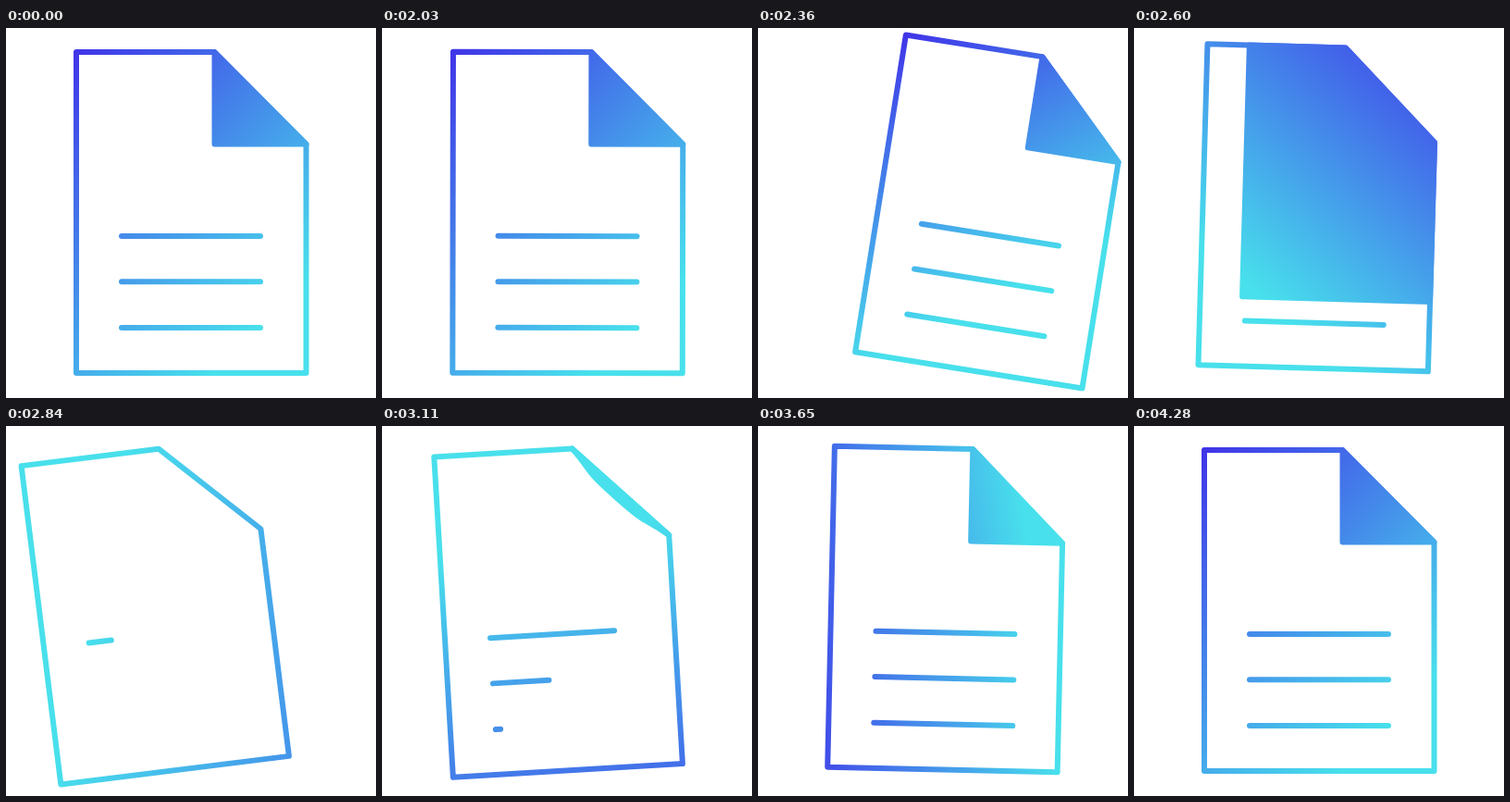
An HTML page with a canvas that plays this animation: 400x400 px, repeating every 4430 ms.

```html
<!DOCTYPE html>
<html lang="en">
<head>
<meta charset="utf-8">
<title>Page turn</title>
<style>
  html, body { margin: 0; width: 100%; height: 100%; overflow: hidden; background: #fff; }
  canvas { display: block; width: 400px; height: 400px; }
</style>
</head>
<body>
<canvas id="stage" width="400" height="400"></canvas>
<script>
const ctx = document.getElementById('stage').getContext('2d');
const LOOP = 4430;
const CX = 200.25, CY = 199.5;

// Page corners
const TL = [76, 26], TR = [225.5, 26], R = [324.5, 125.5], BR = [324.5, 373], BL = [76, 373];
const INNER = [225.5, 125.5];

// Tracks are lists of [time, value]
const SHIFT_X = [[2000, 0], [2350, 55], [2805, -39], [2850, -39], [3350, 15], [3800, 0]];
const SHIFT_Y = [[2000, 0], [2360, -1], [2550, -5.5], [2840, 0.5], [2900, 0.8], [3060, 0], [3380, -6.5], [3800, 0]];
const TILT = [[2000, 0], [2345, 9.1], [2880, -7.2], [2925, -7.2], [3390, 5.1], [3800, 0]];
const ANGLE = [[2000, 45], [2360, 53], [2600, 129], [2840, 200], [3320, 300], [4230, 405]];
const LENGTH = [[2000, 352], [2360, 298], [2600, 352], [2840, 560], [3320, 290], [4230, 352]];
const CENTRE = [[2000, 0.6], [2360, 0.72], [2600, 0.68], [2840, 0.88], [3320, 0.73], [4230, 0.6]];

const clamp = v => Math.min(1, Math.max(0, v));
const mix = (a, b, k) => a + (b - a) * k;
const mixPt = (a, b, k) => [mix(a[0], b[0], k), mix(a[1], b[1], k)];

// Same curve as cubic-bezier(.5, 0, .5, 1)
function ease(x) {
  x = clamp(x);
  let u = x;
  for (let i = 0; i < 5; i++) {
    u -= (1.5 * u * (1 - u) + u ** 3 - x) / (1.5 - 3 * u + 3 * u * u);
  }
  return u * u * (3 - 2 * u);
}
const span = (t, from, to) => ease((t - from) / (to - from));

function locate(track, t) {
  let i = 0;
  while (i < track.length - 2 && t > track[i + 1][0]) i++;
  return i;
}

function eased(track, t) {
  const i = locate(track, t), [t0, a] = track[i], [t1, b] = track[i + 1];
  return mix(a, b, span(t, t0, t1));
}

function smooth(track, t) {
  const i = locate(track, t), [t0, a] = track[i], [t1, b] = track[i + 1];
  const slope = j => j <= 0 || j >= track.length - 1 ? 0 :
    (track[j + 1][1] - track[j - 1][1]) / (track[j + 1][0] - track[j - 1][0]);
  const d = t1 - t0, s = clamp((t - t0) / d), s2 = s * s, s3 = s2 * s;
  return mix(a, b, 3 * s2 - 2 * s3) + d * (slope(i) * (s3 - 2 * s2 + s) + slope(i + 1) * (s3 - s2));
}

function gradient(t) {
  const a = smooth(ANGLE, t) * Math.PI / 180, len = smooth(LENGTH, t), c = smooth(CENTRE, t);
  const at = d => [CX + d * len * Math.cos(a), CY + d * len * Math.sin(a)];
  const g = ctx.createLinearGradient(...at(-c), ...at(1 - c));
  g.addColorStop(0, '#4035e8');
  g.addColorStop(1, '#48e0ec');
  return g;
}

function polygon(points, filled) {
  ctx.beginPath();
  points.forEach(p => ctx.lineTo(...p));
  ctx.closePath();
  if (filled) ctx.fill();
  ctx.stroke();
}

function textLines(t) {
  [225, 274.3, 324].forEach((y, i) => {
    const start = 2660 + i * 180;
    const k = t < 2720 ? 1 : span(t, start, start + 600);
    if (k <= 0.001) return;
    ctx.beginPath();
    ctx.moveTo(125, y);
    ctx.lineTo(125 + 150 * k, y);
    ctx.stroke();
  });
}

// The fold spreads over the page, then leaves by the lower left
function turningFold(t) {
  const k = span(t, 2390, 2740), out = span(t, 2660, 2830);
  const pts = [mixPt(TR, TL, k), TR, R, mixPt(R, BR, k), mixPt(INNER, BL, k)];
  if (out < 1) polygon(pts.map(p => mixPt(p, BL, out)), true);
}

// A new corner curls in from the diagonal
function curlingFold(t) {
  const q = span(t, 2980, 3500), r = 1 - q;
  const p = mixPt([275, 75.75], INNER, q), h = 40 * r, d = 25 * r;
  ctx.beginPath();
  ctx.moveTo(...TR);
  ctx.bezierCurveTo(TR[0] + d, TR[1] + d + 50 * q, p[0] - h, p[1] - h, ...p);
  ctx.bezierCurveTo(p[0] + h, p[1] + h, R[0] - d - 50 * q, R[1] - d, ...R);
  ctx.closePath();
  ctx.fill();
  ctx.stroke();
}

function draw(t) {
  ctx.setTransform(1, 0, 0, 1, 0, 0);
  ctx.fillStyle = '#fff';
  ctx.fillRect(0, 0, 400, 400);
  ctx.translate(CX + eased(SHIFT_X, t), CY + eased(SHIFT_Y, t));
  ctx.rotate(eased(TILT, t) * Math.PI / 180);
  ctx.translate(-CX, -CY);
  ctx.lineWidth = 6;
  ctx.lineCap = ctx.lineJoin = 'round';
  ctx.strokeStyle = ctx.fillStyle = gradient(t);
  textLines(t);
  polygon([TL, TR, R, BR, BL]);
  if (t < 2900) turningFold(t);
  else curlingFold(t);
}

const begin = performance.now();
function frame() {
  draw((performance.now() - begin) % LOOP);
  requestAnimationFrame(frame);
}
frame();
</script>
</body>
</html>
```
